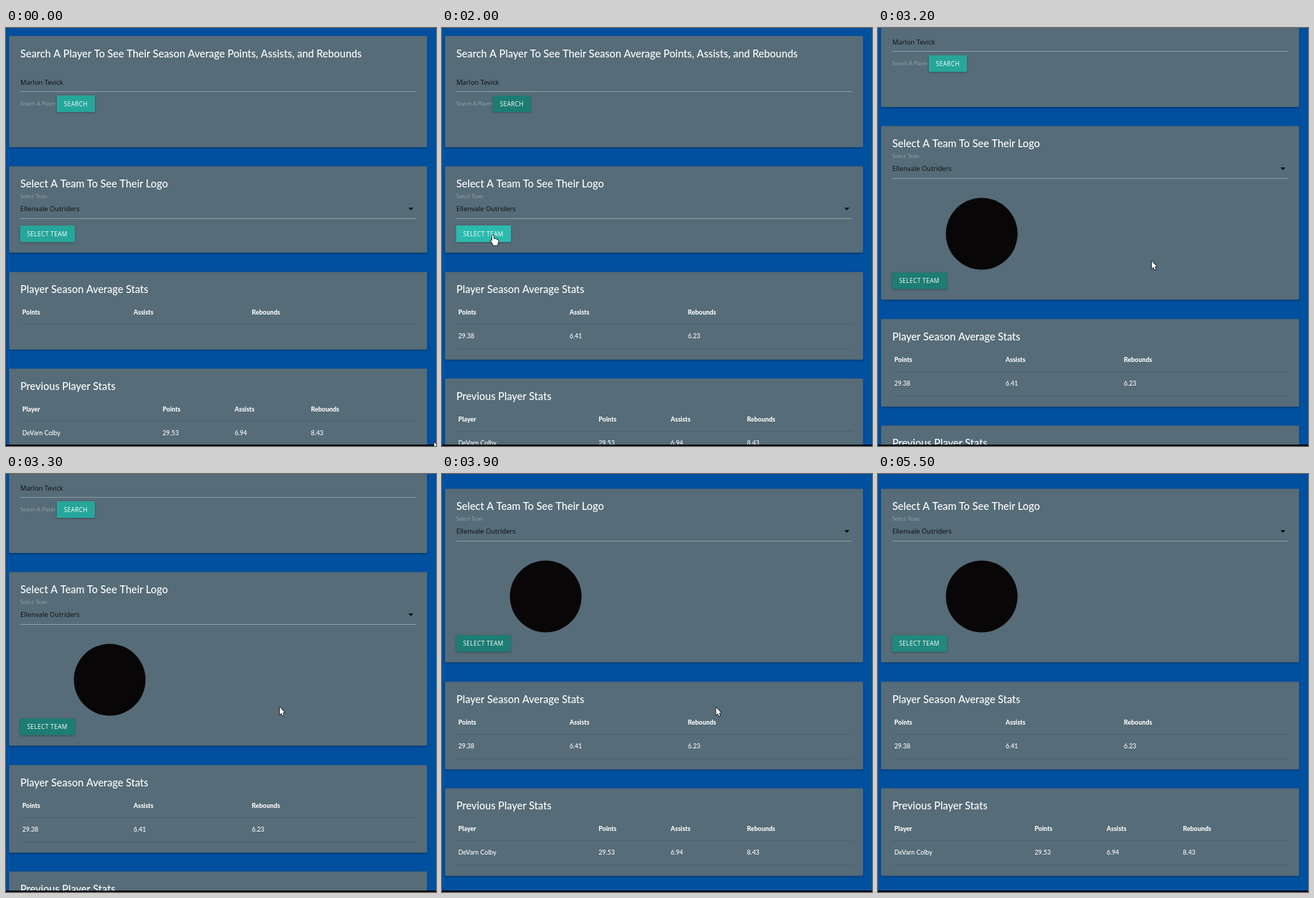
Write an HTML page with a canvas that moves like this. It is 600 px wide and 582 px high and loops after 5.6 s.

```html
<!DOCTYPE html>
<html lang="en">
<head>
<meta charset="utf-8">
<title>Player stats</title>
<style>
html, body { margin: 0; width: 100%; height: 100%; overflow: hidden; background: #0050a0; }
canvas { display: block; width: 600px; height: 582px; }
</style>
</head>
<body>
<canvas id="stage"></canvas>
<script>
const W = 600, H = 582, LOOP = 5600, STEP = 100;
const canvas = document.getElementById('stage');
const ctx = canvas.getContext('2d');
const dpr = window.devicePixelRatio || 1;
canvas.width = W * dpr;
canvas.height = H * dpr;

const LATO = 'Lato, "Open Sans", sans-serif';
const OPEN = '"Open Sans", "Noto Sans", sans-serif';
const TITLE = '500 14.45px ' + LATO;
const HEAD = '800 8.9px ' + LATO;
const CELL = '500 8.8px ' + LATO;
const LABEL = '7.2px ' + LATO;
const FIELD = '9.4px ' + OPEN;
const BUTTON = '500 8.4px ' + OPEN;

const TEAL = '#26a69a', HOVER = '#2bbbad';
const CLICK_SEARCH = 700, CLICK_TEAM = 2000;
const ROW_AT = 800, LOGO_AT = 2200, LOGO_GROW = 121.5;

// [time, x, y] of the pointer tip
const POINTER = [
  [0, 597, 576], [100, 590, 560], [400, 310, 310], [700, 107, 104],
  [1300, 107, 104], [1800, 71, 288], [2300, 71, 288], [2800, 381.5, 324],
  [3800, 381.5, 324], [3900, 382, 324.5], [4200, 594, 590]
];
// [time, page offset]
const SCROLL = [[3000, 0], [3200, 56], [3500, 56], [3700, 114], [3900, 172]];

const smooth = p => p * p * (3 - 2 * p);

function track(keys, t, i) {
  if (t <= keys[0][0]) return keys[0][i];
  for (let k = 1; k < keys.length; k++) {
    const a = keys[k - 1], b = keys[k];
    if (t <= b[0]) return a[i] + (b[i] - a[i]) * smooth((t - a[0]) / (b[0] - a[0]));
  }
  return keys[keys.length - 1][i];
}

function text(str, x, y, font, color = '#fff', spacing = 0) {
  ctx.font = font;
  ctx.letterSpacing = spacing + 'px';
  ctx.fillStyle = color;
  ctx.fillText(str, x, y);
}

function box(x, y, w, h, color, shade) {
  ctx.save();
  ctx.shadowColor = `rgba(0,0,0,${shade})`;
  ctx.shadowBlur = 3 * dpr;
  ctx.shadowOffsetY = dpr;
  ctx.fillStyle = color;
  ctx.beginPath();
  ctx.roundRect(x, y, w, h, 1.3);
  ctx.fill();
  ctx.restore();
}

function line(y, color) {
  ctx.fillStyle = color;
  ctx.fillRect(20, Math.round(y), 552.5, 0.9);
}

function card(y, h, title) {
  box(4.2, y, 583.4, h, '#566c78', 0.38);
  text(title, 20, y + 29.6, TITLE);
}

function button(b, label, color, ripple) {
  box(b.x, b.y, b.w, b.h, color, 0.28);
  if (ripple > 0 && ripple < 600) {
    ctx.save();
    ctx.beginPath();
    ctx.roundRect(b.x, b.y, b.w, b.h, 1.3);
    ctx.clip();
    ctx.fillStyle = `rgba(255,255,255,${0.3 * (1 - ripple / 600)})`;
    ctx.beginPath();
    ctx.arc(b.cx, b.cy, ripple * 0.17, 0, 7);
    ctx.fill();
    ctx.restore();
  }
  text(label, b.x + 9.7, b.y + 14.5, BUTTON, '#fff', 0.35);
}

function table(y, cols, heads, row) {
  heads.forEach((s, i) => text(s, cols[i], y + 59.7, HEAD));
  line(y + 72.5, 'rgba(0,0,0,.1)');
  if (!row) return;
  row.forEach((s, i) => text(s, cols[i], y + 92.7, CELL));
  line(y + 106.5, 'rgba(0,0,0,.1)');
}

function shape(x, y, path) {
  ctx.save();
  ctx.translate(x, y);
  const p = new Path2D(path);
  ctx.lineJoin = 'round';
  ctx.lineWidth = 1.6;
  ctx.strokeStyle = '#111';
  ctx.stroke(p);
  ctx.fillStyle = '#fff';
  ctx.fill(p);
  ctx.restore();
}

const ARROW = 'M.5 .5V11L2.9 8.8L4.4 12.4L6 11.7L4.5 8.2H7.6Z';
const HAND = 'M-1 1Q0-.6 1 1V5.5L3 5.6L5 6.2L7 7Q8 7.4 7.6 9.5L6.6 12.5V14.5H.3V13L-3 8.8Q-3.4 7.2-2 7.5L-1 8.5Z';

const inside = (b, x, y) => x >= b.x && x <= b.x + b.w && y >= b.y && y <= b.y + b.h;

// the focused colour brightens slowly near the end
function focusColor(t) {
  const p = Math.max(0, Math.min(1, (t - 4200) / 1300));
  return `rgb(${29 + 4 * p},${125 + 12 * p},${116 + 10 * p})`;
}

function draw(t) {
  const px = track(POINTER, t, 1), py = track(POINTER, t, 2);
  const scroll = track(SCROLL, t, 1);
  const row = t >= ROW_AT, logo = t >= LOGO_AT;
  const grow = logo ? LOGO_GROW : 0;
  const statsY = 339.7 + grow, prevY = statsY + (row ? 148.4 : 134.6);

  const search = { x: 71, y: 94, w: 53, h: 23, cx: 107, cy: 106 };
  const team = { x: 19.7, y: 275 + grow, w: 76.5, h: 23, cx: 71, cy: 290 + grow };
  const overSearch = inside(search, px, py + scroll);
  const overTeam = inside(team, px, py + scroll);
  const pick = (over, focused) => over ? HOVER : focused ? focusColor(t) : TEAL;

  ctx.setTransform(dpr, 0, 0, dpr, 0, 0);
  ctx.fillStyle = '#0050a0';
  ctx.fillRect(0, 0, W, H);

  ctx.save();
  ctx.translate(0, -Math.round(scroll));

  card(11, 155, 'Search A Player To See Their Season Average Points, Assists, and Rebounds');
  text('Marlon Tevick', 20, 78.5, FIELD, '#0b0e10');
  line(88.4, '#93a2a9');
  text('Search A Player', 20, 107.8, LABEL, '#93a1a8');
  button(search, 'SEARCH', pick(overSearch, t >= CLICK_SEARCH && t <= CLICK_TEAM), t - CLICK_SEARCH);

  card(192.4, 120.3 + grow, 'Select A Team To See Their Logo');
  text('Select Team', 20, 236.5, LABEL, '#93a1a8');
  text('Ellenvale Outriders', 20, 255.2, FIELD, '#0b0e10');
  ctx.fillStyle = '#000';
  ctx.beginPath();
  ctx.moveTo(561.6, 250.2);
  ctx.lineTo(568.4, 250.2);
  ctx.lineTo(565, 253.7);
  ctx.fill();
  line(265.2, '#93a2a9');
  if (logo) {
    ctx.fillStyle = '#080606';
    ctx.beginPath();
    ctx.arc(144.7, 342.5, 50, 0, 7);
    ctx.fill();
  }
  button(team, 'SELECT TEAM', pick(overTeam, t > CLICK_TEAM), t - CLICK_TEAM);

  card(statsY, row ? 122 : 108, 'Player Season Average Stats');
  table(statsY, [22.7, 178, 343], ['Points', 'Assists', 'Rebounds'],
    row && ['29.38', '6.41', '6.23']);

  card(prevY, 122, 'Previous Player Stats');
  table(prevY, [22.7, 218.5, 319, 425.5], ['Player', 'Points', 'Assists', 'Rebounds'],
    ['DeVarn Colby', '29.53', '6.94', '8.43']);
  ctx.restore();

  ctx.fillStyle = '#05080c';
  ctx.fillRect(0, 580, W, 2);
  if (t < 4200) shape(px, py, overSearch || overTeam ? HAND : ARROW);
}

const start = performance.now();
function frame() {
  const t = (performance.now() - start) % LOOP;
  draw(Math.floor(t / STEP) * STEP);
  requestAnimationFrame(frame);
}
frame();
</script>
</body>
</html>
```
